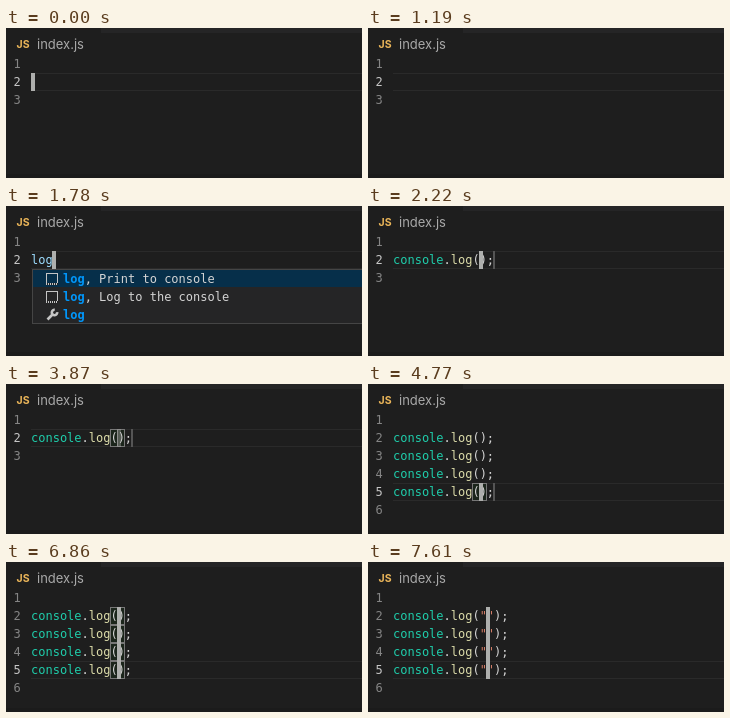
Write an HTML page with a canvas that moves like this. It is 356x150 px and loops after 8000 ms.

```html
<!DOCTYPE html>
<html lang="en">
<head>
<meta charset="utf-8">
<style>
  html, body { margin: 0; height: 100%; overflow: hidden; background: #1e1e1e; }
  canvas { display: block; }
</style>
</head>
<body>
<canvas width="356" height="150"></canvas>
<script>
const ctx = document.querySelector('canvas').getContext('2d');
const LOOP = 8000, LEFT = 25, CHAR = 7.22, ROW = 18;
const MONO = '12px "DejaVu Sans Mono", monospace';
const FG = '#d4d4d4';

// Caret opacity: [start time, alpha]
const BLINK = [
  [0, 1], [150, 0], [740, 1], [1040, .4], [1190, 0], [1480, 1],
  [2820, .4], [2970, 0], [3420, .4], [3570, 1], [3870, .4], [4020, 0], [4170, 1],
  [5370, .4], [5520, 0], [5970, .4], [6120, 1], [6420, .4], [6570, 1],
  [7310, .4], [7460, 0], [7610, 1]
];

const SNIPPETS = [['snippet', 'log, Print to console'], ['snippet', 'log, Log to the console']];

const rowTop = line => 27 + (line - 1) * ROW;
const colX = col => Math.floor(LEFT + col * CHAR);
const countPassed = (t, times) => times.filter(at => t >= at).length;

function rect(x, y, w, h, color) {
  ctx.fillStyle = color;
  ctx.fillRect(x, y, w, h);
}

function text(str, x, y, color, font = MONO) {
  ctx.font = font;
  ctx.fillStyle = color;
  ctx.fillText(str, x, y);
}

// Draws [text, color, bold] parts side by side in the monospaced grid
function parts(list, x, y) {
  for (const [str, color, bold] of list) {
    text(str, x, y, color, (bold ? 'bold ' : '') + MONO);
    x += str.length * CHAR;
  }
}

function chrome() {
  rect(0, 0, 356, 150, '#1e1e1e');
  rect(95, 0, 261, 5, '#252526');
  rect(0, 146, 356, 4, '#1b1b1b');
  text('JS', 10.5, 20, '#eab559', 'bold 10.5px Inter, sans-serif');
  text('index.js', 31, 21, '#a9a9a9', '13px Inter, sans-serif');
}

function gutter(count, active) {
  rect(LEFT, rowTop(active), 331, 1, '#2a2a2a');
  rect(LEFT, rowTop(active) + 17, 331, 1, '#2a2a2a');
  for (let n = 1; n <= count; n++)
    text(n, 7.5, rowTop(n) + 13, n === active ? '#c6c6c6' : '#858585');
}

function logCall(line, quotes) {
  parts([['console', '#1fcdab'], ['.', FG], ['log', '#dcdcaa'], ['(', FG],
    [quotes, '#d27c66'], [');', FG]], LEFT, rowTop(line) + 13);
}

function brackets(line) {
  for (const col of [11, 12]) {
    const x = colX(col), y = rowTop(line);
    rect(x, y, 7, 17, 'rgba(0,100,0,.1)');
    ctx.strokeStyle = '#777';
    ctx.lineWidth = 1;
    ctx.strokeRect(x + .5, y + .5, 7, 17);
  }
}

function caret(line, col, alpha) {
  ctx.globalAlpha = alpha;
  rect(colX(col), rowTop(line), 4, ROW, '#aeafad');
  ctx.globalAlpha = 1;
}

function icon(kind, x, y) {
  ctx.strokeStyle = '#c5c5c5';
  if (kind === 'snippet') {
    ctx.lineWidth = 1;
    ctx.strokeRect(x + .5, y + .5, 11, 10);
    rect(x, y + 10, 12, 2, '#252526');
    for (let i = 0; i < 12; i += 2) rect(x + i, y + 10, 1, 2, '#c5c5c5');
  } else {
    ctx.lineWidth = 2.6;
    ctx.beginPath();
    ctx.moveTo(x + 1.5, y + 10.5);
    ctx.lineTo(x + 6.5, y + 5.5);
    ctx.stroke();
    ctx.beginPath();
    ctx.arc(x + 8.5, y + 3.5, 2.7, -.1, 4.8);
    ctx.stroke();
  }
}

function suggestions(typed) {
  const items = typed === 'l'
    ? [...SNIPPETS, ['snippet', 'eslint-disable-line'], ['wrench', 'label'], ['wrench', 'leg']]
    : [...SNIPPETS, ['wrench', typed]];
  const top = 63, height = items.length * ROW + 1;
  rect(26, top, 330, height, '#454545');
  rect(27, top + 1, 329, height - 2, '#252526');
  rect(27, top + 1, 329, ROW - 1, '#062f4a');
  items.forEach(([kind, label], i) => {
    const y = top + 1 + i * ROW, at = label.lastIndexOf('-') + 1;
    const match = label.startsWith('log') || !at ? 0 : at;
    icon(kind, 40, y + 3);
    parts([
      [label.slice(0, match), FG],
      [typed, '#0097fb', true],
      [label.slice(match + typed.length), FG]
    ], 57, y + 13);
  });
}

function draw(t) {
  const alpha = BLINK.findLast(([at]) => t >= at)[1];
  const copies = countPassed(t, [4170, 4470, 4770]);
  const active = 2 + copies;
  chrome();
  gutter(3 + copies, active);

  if (t < 2220) {
    const typed = 'log'.slice(0, countPassed(t, [1480, 1630, 1780]));
    text(typed, LEFT, rowTop(2) + 13, '#9cdcfe');
    if (typed) suggestions(typed);
    caret(2, typed.length, alpha);
    return;
  }

  const quoted = t >= 7610;
  const firstCaret = active - countPassed(t, [6570, 6710, 6860]);
  for (let line = 2; line <= active; line++) {
    const hasCaret = line >= firstCaret;
    if (hasCaret && t >= 2370 && !quoted) brackets(line);
    logCall(line, quoted ? '""' : '');
    if (hasCaret) caret(line, quoted ? 13 : 12, alpha);
  }
  // Final tab stop of the snippet
  if (t < 6570) rect(125, rowTop(active), 2, ROW, '#555');
}

function tick() {
  draw(performance.now() % LOOP);
  requestAnimationFrame(tick);
}
tick();
</script>
</body>
</html>
```
